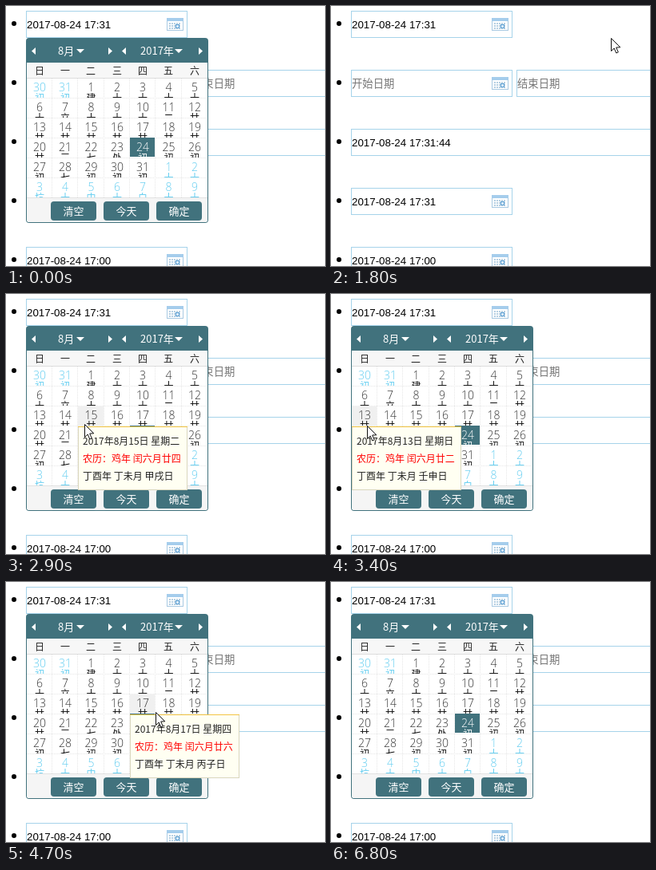
Animation, 399 px wide and 326 px high, one loop 7900 ms. Source, as an HTML page with a canvas:

```html
<!DOCTYPE html>
<html lang="zh">
<head>
<meta charset="utf-8">
<style>
html, body { margin: 0; width: 100%; height: 100%; overflow: hidden; background: #fff; }
canvas { display: block; }
</style>
</head>
<body>
<canvas id="stage" width="399" height="326"></canvas>
<script>
const ctx = document.getElementById('stage').getContext('2d');
const LOOP = 7900, TICK = 100;
const ARIAL = '"Liberation Sans", Arial, sans-serif';
const CJK = '"Noto Sans CJK SC", "Noto Sans CJK", sans-serif';
const LIGHT = '"Open Sans", ' + CJK;
const TEAL = '#41727d', BLUE = '#a6d3ea';

const WEEK = '日一二三四五六', NUM = '一二三四五六七八九十';
const STEMS = '甲乙丙丁戊己庚辛壬癸', BRANCHES = '子丑寅卯辰巳午未申酉戌亥';
const FEASTS = { 2: '建军', 8: '立秋', 23: '七月', 24: '处暑', 29: '七夕', 35: '抗战', 37: '中元', 39: '白露' };
const TODAY = 25;

// Pointer keys: tick, x, y. A lone tick rests at the previous place.
const PATH = [
  [3, 101, 25], [4, 101, 30], [5, 101, 88], [6, 146, 128], [8, 235, 130], [14],
  [17, 348, 44], [18, 350, 40], [19, 325, 39], [21, 140, 25], [22, 125, 35], [24],
  [28, 101, 148], [30, 95, 178], [32, 48, 178], [33, 45, 160], [36, 46, 174], [37],
  [39, 96, 155], [40, 113, 152], [42, 138, 97], [45, 182, 122], [46, 186, 150], [47, 187, 163],
  [49, 206, 182], [51, 204, 224], [53, 174, 224], [54, 177, 242], [56, 205, 260], [58, 221, 261], [62],
  [64, 222, 252], [65], [67, 343, 156]
];

// Day whose tip is open: tick, day index.
const TIPS = [
  [0], [8, 13], [15], [28, 16], [30, 23], [31, 22], [32, 21], [33, 14], [35, 21], [38, 15],
  [39, 16], [43, 11], [46, 18], [48, 26], [50, 33], [51, 40], [53, 39], [54]
];

PATH.forEach((k, i) => {
  if (k.length === 1) k.push(...PATH[i - 1].slice(1));
});

function pointerAt(tick) {
  const i = PATH.findIndex(k => k[0] >= tick);
  if (tick < PATH[0][0] || i < 0) return null;
  const b = PATH[i], a = PATH[Math.max(0, i - 1)];
  const p = b === a ? 1 : (tick - a[0]) / (b[0] - a[0]);
  return [1, 2].map(j => Math.round(a[j] + (b[j] - a[j]) * p));
}

const colX = c => Math.round(25.7 + c * 32.35);
const rowY = r => 90 + r * 25;

function rect(x, y, w, h, color) {
  ctx.fillStyle = color;
  ctx.fillRect(x, y, w, h);
}

function frame(x, y, w, h, color) {
  ctx.strokeStyle = color;
  ctx.lineWidth = 1;
  ctx.strokeRect(x + .5, y + .5, w - 1, h - 1);
}

function round(x, y, w, h, r, color) {
  ctx.fillStyle = color;
  ctx.beginPath();
  ctx.roundRect(x, y, w, h, r);
  ctx.fill();
}

function poly(points, color) {
  ctx.beginPath();
  points.forEach(([x, y]) => ctx.lineTo(x, y));
  ctx.closePath();
  ctx.fillStyle = color;
  ctx.fill();
}

function text(s, x, y, font, color, align = 'left') {
  ctx.font = font;
  ctx.fillStyle = color;
  ctx.textAlign = align;
  ctx.fillText(s, x, y);
}

function icon(x, y) {
  rect(x, y, 21, 16, '#fff');
  frame(x, y, 21, 16, '#a8c9e2');
  rect(x, y, 21, 4, '#a5cdec');
  for (let r = 0; r < 3; r++)
    for (let c = 0; c < 5; c++) rect(x + 3 + c * 3, y + 6 + r * 3, 2, 2, '#b5cfe2');
  rect(x + 11, y + 8, 5, 5, '#5d9fd2');
  rect(x + 12, y + 9, 3, 3, '#d5e9f7');
}

function field(x, y, w, s, hint) {
  rect(x, y, w, 34, '#fff');
  frame(x, y, w, 34, BLUE);
  text(s, x + 1, y + 22, '13.333px ' + (hint ? CJK : ARIAL), hint ? '#757575' : '#000');
  icon(x + w - 26, y + 9);
}

function page() {
  rect(0, 0, 399, 326, '#fff');
  for (let i = 0; i < 5; i++) round(7, 19 + i * 74, 6, 6, 3, '#000');
  field(25, 6, 202, '2017-08-24 17:31');
  field(25, 80, 202, '开始日期', true);
  field(232, 80, 202, '结束日期', true);
  field(25, 154, 402, '2017-08-24 17:31:44');
  field(25, 228, 202, '2017-08-24 17:31');
  field(25, 302, 202, '2017-08-24 17:00');
}

function dateOf(n) {
  const d = new Date(2017, 6, 30 + n);
  return { month: d.getMonth() + 1, day: d.getDate() };
}

function lunar(n) {
  const leap = n < 23, d = leap ? n + 8 : n - 22;
  const tens = d === 20 ? '二' : d === 30 ? '三' : '初十廿'[Math.floor((d - 1) / 10)];
  return { leap, day: tens + NUM[(d - 1) % 10] };
}

function sideArrow(x, dir) {
  poly([[x, 52], [x, 61], [x + 5 * dir, 56.5]], '#fff');
}

function downArrow(x) {
  poly([[x, 54], [x + 10, 54], [x + 5, 59]], '#fff');
}

function cell(n, hover) {
  const c = n % 7, x = colX(c), y = rowY(Math.floor(n / 7)), w = colX(c + 1) - x;
  const { month, day } = dateOf(n), chosen = n === TODAY, other = month !== 8;
  if (chosen) rect(x, y, w - 1, 24, TEAL);
  else if (n === hover) rect(x, y + 1, w - 1, 24, '#f0f0f0');
  const mid = x + w / 2;
  ctx.save();
  ctx.beginPath();
  ctx.rect(x, y, w, chosen ? 24 : 25);
  ctx.clip();
  text(day, mid, y + 17, '300 14px ' + LIGHT, chosen ? '#fff' : other ? '#62cdf0' : '#333', 'center');
  text((FEASTS[n] || lunar(n).day)[0], mid, y + 30, '12px ' + CJK,
    chosen ? '#fff' : other ? '#62cdf0' : '#111', 'center');
  ctx.restore();
}

function grid() {
  ctx.strokeStyle = '#e6e6e6';
  ctx.lineWidth = 1;
  ctx.setLineDash([1, 1]);
  ctx.beginPath();
  for (let i = 1; i < 7; i++) {
    ctx.moveTo(colX(i) - .5, 91);
    ctx.lineTo(colX(i) - .5, 240);
    ctx.moveTo(26, rowY(i) + .5);
    ctx.lineTo(252, rowY(i) + .5);
  }
  ctx.stroke();
  ctx.setLineDash([]);
}

function calendar(hover) {
  round(25, 40, 228, 232, 4, TEAL);
  round(26, 71, 226, 200, [0, 0, 3, 3], '#fff');
  sideArrow(37, -1);
  sideArrow(128, 1);
  sideArrow(150, -1);
  sideArrow(241, 1);
  text('8月', 65, 61, '13px ' + CJK, '#fff');
  downArrow(88);
  text('2017年', 168, 61, '13px ' + CJK, '#fff');
  downArrow(211);

  rect(26, 71, 226, 19, '#f7f7f7');
  rect(26, 90, 226, 1, '#ddd');
  [...WEEK].forEach((s, i) => text(s, colX(i) + 16, 86, '12px ' + CJK, '#222', 'center'));
  grid();
  for (let n = 0; n < 42; n++) cell(n, hover);

  round(26, 241, 226, 30, [0, 0, 3, 3], '#f5f5f5');
  rect(26, 240, 226, 1, '#e2e2e2');
  ['清空', '今天', '确定'].forEach((s, i) => {
    round(56 + i * 66, 245, 57, 24, 4, TEAL);
    text(s, 84.5 + i * 66, 262, '13px ' + CJK, '#fff', 'center');
  });
}

function tip(n) {
  const { month, day } = dateOf(n), { leap, day: name } = lunar(n);
  const x = colX(n % 7), y = rowY(Math.floor(n / 7)) + 26;
  const ganzhi = STEMS[(n + 4) % 10] + BRANCHES[(n + 6) % 12];
  const lines = [
    `2017年${month}月${day}日 星期${WEEK[n % 7]}`,
    `农历：鸡年 ${leap ? '闰六' : '七'}月${name}`,
    `丁酉年 ${leap ? '丁未' : '戊申'}月 ${ganzhi}日`
  ];
  if (n === 39) lines.push('节气：' + FEASTS[n]);
  const w = leap ? 137 : month === 8 ? 133 : 129, h = 14 + lines.length * 22;
  rect(x, y, w, h, '#fffff2');
  frame(x, y, w, h, '#d9d6bd');
  rect(x, y, w, 1, '#f3c544');
  lines.forEach((s, i) => text(s, x + 6, y + 23 + i * 22, '12px ' + CJK, i === 1 ? '#f00' : '#222'));
}

function pointer(x, y) {
  ctx.save();
  ctx.translate(x + .5, y + .5);
  poly([[0, 0], [0, 16], [3.7, 12.5], [6.3, 18.5], [8.8, 17.4], [6.2, 11.5], [11.3, 11.3]], '#fff');
  ctx.strokeStyle = '#111';
  ctx.lineWidth = 1;
  ctx.stroke();
  ctx.restore();
}

function draw() {
  const tick = Math.floor(performance.now() % LOOP / TICK);
  const day = TIPS.filter(k => k[0] <= tick).pop()[1];
  const spot = pointerAt(tick);
  page();
  if (tick < 18 || tick >= 22) calendar(day);
  if (day !== undefined) tip(day);
  if (spot) pointer(...spot);
  requestAnimationFrame(draw);
}
draw();
</script>
</body>
</html>
```
